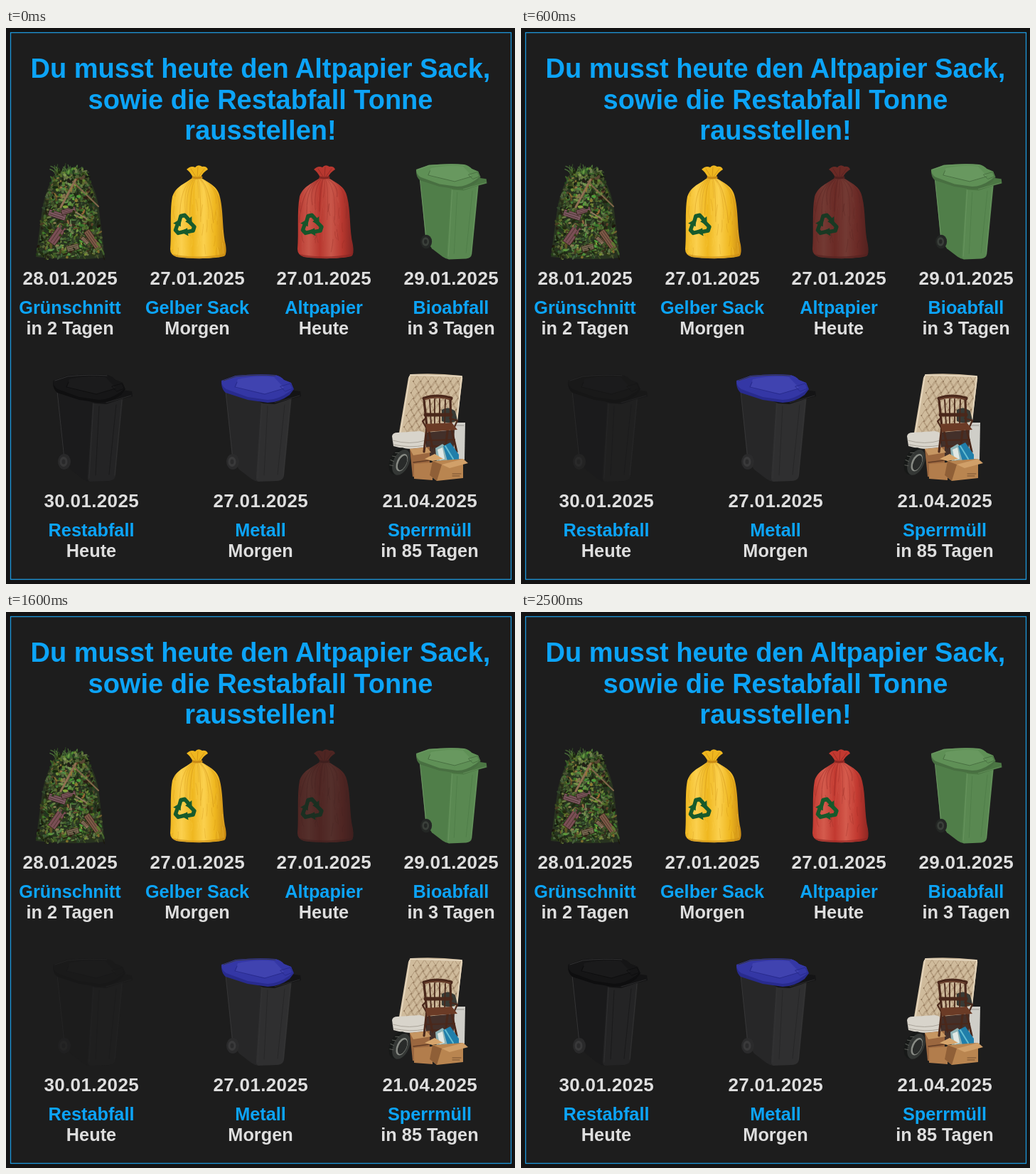
These frames come from a looping animation (716x782 px, 2.6 s). An HTML page:

```html
<!DOCTYPE html>
<html lang="de">
<head>
<meta charset="utf-8">
<title>Abfallkalender</title>
<style>
html, body { margin: 0; width: 100%; height: 100%; overflow: hidden; background: #131313; }
svg { display: block; width: 716px; height: 782px; }
text { font: bold 25.3px "Liberation Sans", Arial, sans-serif; text-anchor: middle; fill: #dedede; }
.title { font-size: 38px; }
.title, .name { fill: #0ca4f8; }
.date { font-size: 26px; letter-spacing: .35px; }
</style>
</head>
<body>
<svg id="stage" viewBox="0 0 716 782"></svg>
<script>
let seed = 7;
const rnd = (a = 0, b = 1) => {
  seed = (seed * 1664525 + 1013904223) % 4294967296;
  return a + (b - a) * seed / 4294967296;
};
const repeat = (n, f) => Array.from({ length: n }, (_, i) => f(i)).join('');
const shape = (d, fill, more = '') => `<path d="${d}" fill="${fill}" ${more}/>`;
const line = (d, color, w = 1, more = '') =>
  `<path d="${d}" fill="none" stroke="${color}" stroke-width="${w}" stroke-linecap="round" stroke-linejoin="round" ${more}/>`;
const oval = (x, y, rx, ry, fill, more = '') =>
  `<ellipse cx="${x}" cy="${y}" rx="${rx}" ry="${ry}" fill="${fill}" ${more}/>`;
const group = (more, body) => `<g ${more}>${body}</g>`;
const label = (x, y, s, cls) => `<text x="${x}" y="${y}" class="${cls}">${s}</text>`;
const gradient = (id, colors) => `<linearGradient id="${id}">` +
  colors.map((c, i) => `<stop offset="${i / (colors.length - 1)}" stop-color="${c}"/>`).join('') + '</linearGradient>';

function pile() {
  const half = y => 20 + 28 * Math.pow(Math.max(0, (y - 198) / 126), .65);
  const leaf = () => {
    const y = 198 + 125 * Math.pow(rnd(), .85), k = rnd(-1, 1), x = 90 + k * half(y);
    const hue = rnd() < .15 ? rnd(25, 50) : rnd(72, 112);
    const lum = rnd(11, 47) * (1 - .3 * k * k);
    return oval(0, 0, rnd(1.5, 4.2).toFixed(1), rnd(.7, 2.1).toFixed(1), `hsl(${hue | 0} ${rnd(22, 50) | 0}% ${lum | 0}%)`,
      `transform="translate(${x.toFixed(1)} ${y.toFixed(1)}) rotate(${rnd(0, 180) | 0})"`);
  };
  const sprig = () => {
    const x = rnd(69, 111), y = 212 - rnd(0, 8);
    return line(`M${x} ${y}q${rnd(-3, 3)} -8 ${rnd(-5, 5) + (x - 90) * .2} ${-rnd(6, 15)}`, `hsl(100 32% ${rnd(18, 36)}%)`, 1.3);
  };
  const plank = (x, y, w, h, angle, color) => group(`transform="translate(${x} ${y}) rotate(${angle})"`,
    shape(`M${-w / 2} ${-h / 2}h${w}v${h}h${-w}z`, color, 'stroke="#33201a" stroke-width=".8"') +
    line(`M${-w / 2 + 2} ${-h / 6}h${w - 4}M${-w / 2 + 2} ${h / 5}h${w - 5}`, '#4a302c', .8));
  return shape('M72 204Q90 190 110 204C126 222 130 245 132 265L139 323Q90 328 42 322L50 262Q55 222 72 204Z', '#283320') +
    repeat(38, sprig) + repeat(1050, leaf) +
    line('M98 213L77 252', '#8f7053', 3) + line('M94 216L130 251', '#80654a', 2) + line('M87 252L113 268', '#92785f', 2) +
    plank(72, 263, 25, 9, 18, '#7c5962') + plank(88, 257, 20, 7, -16, '#805a62') +
    plank(72, 291, 29, 12, -55, '#7a4f55') + plank(122, 298, 31, 9, 55, '#7d5a46') +
    plank(94, 309, 17, 8, -15, '#776c52') + plank(111, 299, 12, 5, 45, '#927b62') + repeat(70, leaf);
}

const bag = 'M262 211C252 219 239 222 234 237C230 258 233 288 231 311Q231 319 240 322C260 325 290 325 307 321Q311 318 309 305C304 285 306 258 301 238C298 222 285 218 275 211Z';
function sack(id, dx, light, mid, dark) {
  const fold = i => {
    const x = 235 + i * 3.4;
    return line(`M${263 + i * .55} 211Q${x + rnd(-3, 3)} 222 ${x + rnd(-4, 4)} ${rnd(232, 275)}`,
      i % 2 ? light : dark, rnd(.6, 1.4), 'opacity=".4"');
  };
  const crease = i => {
    const x = rnd(233, 305), y = rnd(240, 312);
    return line(`M${x} ${y}q${rnd(-4, 4)} ${rnd(4, 9)} ${rnd(-3, 3)} ${rnd(9, 18)}`, i % 2 ? light : dark, .9, 'opacity=".35"');
  };
  const arrow = i => group(`transform="translate(251 277.5) rotate(${i * 120 - 12}) scale(1.15 1.25)"`,
    line('M-6 -4L-2 -11H3L6 -6', '#175a2c', 4.6, 'stroke-linecap="butt"') + shape('M2 -4L11 -8L9 2Z', '#175a2c'));
  return group(`transform="translate(${dx} 0)"`,
    `<defs>${gradient(id, [mid, light, mid, light, mid, dark])}</defs>` +
    shape(bag, `url(#${id})`) +
    group('clip-path="url(#bag)"', repeat(21, fold) + repeat(34, crease) +
      line('M231 319Q268 327 309 319', dark, 3, 'opacity=".6"')) +
    shape('M263 210Q258 201 254 199Q260 193 266 196Q270 191 276 195Q282 194 284 199Q277 203 274 210Z', mid) +
    line('M260 198L267 209M270 196L269 209M279 198L271 209', dark, 1, 'opacity=".7"') +
    line('M263 210Q268 212 275 210', dark, 3) + repeat(3, arrow));
}

function bin(x, y, scale, c) {
  return group(`transform="translate(${x} ${y}) scale(${scale})"`,
    shape('M7 22L60 36L53 151Q47 150 43 147L26 134L16 119Z', c.left) +
    shape('M57 36L100 31L89 143Q88 149 80 150L53 151Q49 150 50 142Z', c.right) +
    line('M7 24L17 119', c.edge, 1) + line('M58 42L52 146', c.edge, .7) +
    line('M66 45L61 142M90 43L80 141', c.left, 1) + line('M98 36L88 142', c.edge, .8) +
    shape('M38 32L98 22L112 24L113 31L97 35L76 42L60 41Z', c.rim) + line('M76 40L111 30', c.edge, .7) +
    shape('M1 11L21 2Q52 -1 77 1Q85 3 89 8L99 12L103 21L97 29Q82 40 66 40L38 36L7 26Q1 21 1 11Z', c.shade) +
    shape('M1 9L21 2Q52 -1 77 1Q85 3 89 8L99 12L102 20L96 25Q80 36 66 36L38 32L8 21Q1 17 1 9Z', c.lid) +
    shape('M24 7Q51 1 75 4L90 20L64 28L20 19Z', c.top) +
    line('M23 11L20 18L62 28L89 20', c.shade, 1.1) + line('M4 9L22 3Q53 0 77 2', c.edge, .9) +
    line('M84 17L98 13L101 20L91 24Z', c.shade, 1) +
    oval(17, 123, 9, 11, c.wheel) + oval(16, 123, 5.5, 7, c.hub) + oval(16, 123, 2.5, 3.5, c.wheel));
}

const black = { lid: '#161617', top: '#1b1b1c', shade: '#0f0f10', left: '#1b1b1c', right: '#252526', rim: '#141415', edge: '#363637', wheel: '#2b2b2c', hub: '#3a3a3b' };
const blue = { ...black, lid: '#3437a5', top: '#4043b0', shade: '#282b8e', left: '#272728', right: '#2f2f30' };
const green = { lid: '#5f9056', top: '#68985f', shade: '#486f41', left: '#507e49', right: '#598851', rim: '#4b7643', edge: '#709b67', wheel: '#242725', hub: '#3a3f3a' };

function bulky() {
  const tuft = i => {
    const r = Math.floor(i / 7), k = i % 7;
    const x = 573 + k * 10.5 + (r % 2) * 5 - r * 1.6, y = 497 + r * 8;
    return line(`M${x} ${y}l5.2 -8l5.2 8l-5.2 8z`, '#a99072', .8) + oval(x, y, 1, 1, '#8d7357');
  };
  const wood = '#4a281b';
  return shape('M569 487Q606 485 640 489Q643 490 642 494L632 574L554 577Q552 574 553 569L566 492Z', '#cfbb9c') +
    group('clip-path="url(#mattress)"', repeat(70, tuft)) +
    line('M569 488L641 490L632 573M568 490L554 574', '#e3d4bb', 2) +
    shape('M613 555L646 555L645 607L611 605Z', '#cfcec8') + line('M616 559H644M629 558V604', '#999791', 1) +
    shape('M543 574Q544 569 551 569L582 567Q591 568 591 574V590Q569 595 545 588Z', '#d8d4cb') +
    line('M544 580Q568 587 590 580M546 586Q568 591 589 587', '#aaa49a', 1) +
    shape('M591 569L631 565L629 606H592Z', '#43302a') +
    shape('M568 592L596 589V634L572 631Z', '#9b673f') + shape('M568 592L592 590L598 597L573 601Z', '#c69662') +
    shape('M574 613L600 611V636L574 634Z', '#b27d4c') + line('M573 611L596 608', '#613c26', 1.5) +
    shape('M613 537Q622 531 632 539L635 552Q624 558 613 553Z', '#383a35') +
    line('M588 523L592 561L588 596M625 522L626 561L634 596M593 559L600 590M622 560L618 591', wood, 3.2) +
    line('M588 521Q606 515 626 521M590 544H626', wood, 5) +
    line('M596 523L598 558M603 522V558M610 522V558M618 523L617 558', wood, 1.8) +
    line('M590 549L586 553L591 562M624 549L635 552L630 563', wood, 2.2) +
    shape('M590 557L627 555L635 565L592 568Z', '#6b3b26') + line('M592 580L631 579M597 588H620', wood, 1.8) +
    line('M589 522Q606 517 625 522', '#805039', 1) +
    shape('M604 591L614 585L621 591L624 611L606 612Z', '#8fb4b7') + shape('M607 593L614 590L617 606L610 608Z', '#e1e8e4') +
    shape('M615 588L625 583L637 600L637 610L621 609Z', '#207eaa') + line('M618 588L629 606', '#65bdd2', 2) +
    shape('M600 609L643 606V633L606 637L596 629Z', '#b98550') + shape('M600 609L613 614L606 637L596 629Z', '#8f5f37') +
    shape('M600 609L589 606L603 599L615 606Z', '#d6a56c') + shape('M613 614L643 606L650 612L624 619Z', '#d1a069') +
    line('M628 627H640M628 630H638', '#765030', 1) +
    group('transform="translate(554 610) rotate(24)"', oval(-2, 0, 12, 20, '#171918') + oval(2, 0, 11, 19, '#343735') +
      oval(3, 0, 7, 13, '#888b85') + oval(4, 0, 5.5, 11, '#292b2a') +
      line('M-11 -9L-6 -11M-13 -3L-8 -4M-13 3L-8 3M-11 10L-6 9', '#5b5d58', 1));
}

const items = [
  [90, 361, '28.01.2025', 'Grünschnitt', 'in 2 Tagen'],
  [269, 361, '27.01.2025', 'Gelber Sack', 'Morgen'],
  [447, 361, '27.01.2025', 'Altpapier', 'Heute'],
  [626, 361, '29.01.2025', 'Bioabfall', 'in 3 Tagen'],
  [120, 674, '30.01.2025', 'Restabfall', 'Heute'],
  [358, 674, '27.01.2025', 'Metall', 'Morgen'],
  [596, 674, '21.04.2025', 'Sperrmüll', 'in 85 Tagen']
];
const title = ['Du musst heute den Altpapier Sack,', 'sowie die Restabfall Tonne', 'rausstellen!'];

document.getElementById('stage').innerHTML =
  `<defs><clipPath id="bag"><path d="${bag}"/></clipPath>
   <clipPath id="mattress"><path d="M570 489L640 491L631 572L555 574Z"/></clipPath></defs>
   <rect x="6.5" y="6.5" width="704" height="769" fill="#1d1d1d" stroke="#1e98dc" stroke-width="1.3"/>` +
  title.map((s, i) => label(358, 70 + i * 43.7, s, 'title')).join('') +
  items.map(([x, y, date, name, when]) =>
    label(x + .2, y, date, 'date') + label(x, y + 41, name, 'name') + label(x, y + 70, when, 'when')).join('') +
  pile() + sack('yellow', 0, '#fbd04e', '#efb71f', '#c98a14') + bin(576, 191, .89, green) +
  bin(302, 487, 1, blue) + bulky() +
  group('id="due"', sack('red', 179, '#d65c4e', '#c43a31', '#8f2723') + bin(65, 487, 1, black));

const due = document.getElementById('due');
function draw(now) {
  const t = Math.floor(now % 2600 / 100) * 100;
  due.setAttribute('opacity', Math.min(1, Math.abs(t - 1210) / 1300));
  requestAnimationFrame(draw);
}
draw(performance.now());
</script>
</body>
</html>
```
